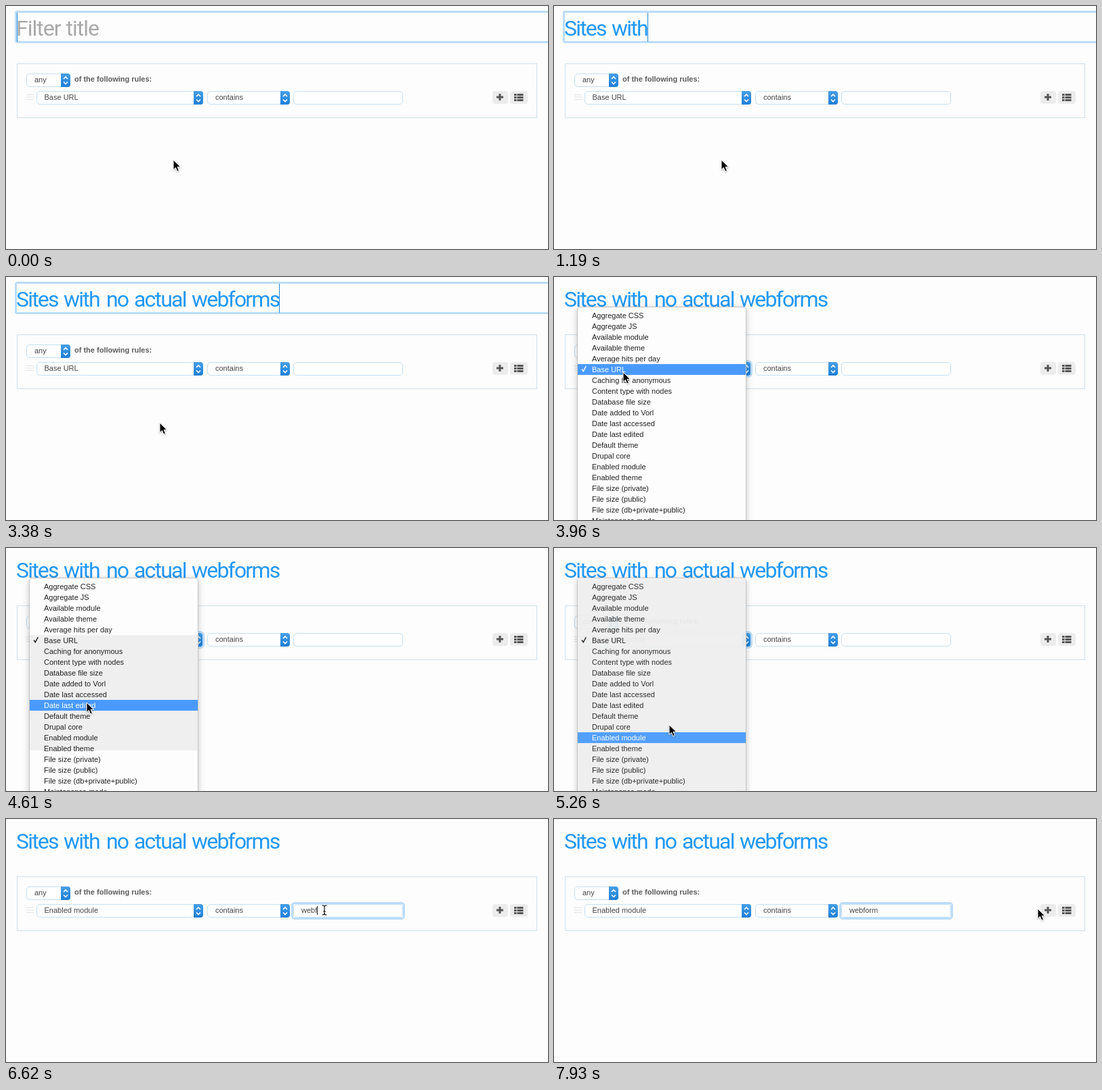
An HTML page for the animation above (7990 ms loop, 800x360 px).

```html
<!DOCTYPE html>
<html lang="en">
<head>
<meta charset="utf-8">
<title>Filter builder</title>
<style>
  html, body { margin: 0; width: 100%; height: 100%; overflow: hidden; background: #fdfdfd; }
  svg { display: block; width: 800px; height: 360px; }
  text { font: 11px "Liberation Sans", Arial, sans-serif; fill: #444; white-space: pre; }
  .title text { font: 32px Roboto, sans-serif; letter-spacing: -1.8px; fill: #2098f5; }
  .title .hint { letter-spacing: -1px; fill: #a9a9a9; }
  .bold { font-weight: bold; fill: #5c5c5c; }
  .field { fill: #fff; stroke: #c3dff1; }
  .ring { fill: none; stroke: #bbdcf8; stroke-width: 3; }
  #menu { filter: drop-shadow(0 2px 5px rgba(0, 0, 0, .22)); }
  #menu text { fill: #222; }
  #menu .on { fill: #fff; }
</style>
</head>
<body>
<svg viewBox="0 0 800 360">
  <defs>
    <linearGradient id="cap" x2="0" y2="1">
      <stop stop-color="#469fe6"/><stop offset="1" stop-color="#1d7fd6"/>
    </linearGradient>
    <filter id="soft" x="-50%" y="-50%" width="200%" height="200%">
      <feDropShadow dx="0" dy="1" stdDeviation="1" flood-opacity=".35"/>
    </filter>
  </defs>
  <rect width="800" height="360" fill="#fdfdfd"/>

  <g class="title">
    <g id="titleRing">
      <rect class="ring" x="14.5" y="8.5" width="800" height="45" rx="2"/>
    </g>
    <g id="hint"><text class="hint" x="15" y="44">Filter</text><text class="hint" x="88.5" y="44">title</text></g>
    <g id="words"></g>
    <rect id="titleCaret" y="10" width="1" height="43" fill="#2186dc"/>
  </g>

  <rect x="16.5" y="85.5" width="767" height="80" fill="none" stroke="#cfdfe9"/>
  <path d="M30 131.5h11M30 135h11M30 138.5h11" stroke="#e2e2e2"/>
  <g id="selects"></g>
  <text class="bold" x="101" y="112">of the following rules:</text>
  <rect class="field" x="424.5" y="126.5" width="161" height="19" rx="4.5"/>
  <rect id="selectRing" class="ring" x="43.5" y="124.5" width="248" height="23" rx="5"/>
  <rect id="inputRing" class="ring" x="422.5" y="124.5" width="165" height="23" rx="4"/>
  <text id="query" x="436" y="139"></text>
  <rect id="inputCaret" y="129" width="1" height="13" fill="#222"/>

  <g fill="#ececec">
    <rect x="718" y="126" width="23" height="19" rx="4"/>
    <rect x="744" y="126" width="26" height="19" rx="4"/>
  </g>
  <path d="M724 135h10M729 130v10" stroke="#555" stroke-width="3"/>
  <path d="M750 131.5h3.5m1 0h9M750 135.5h3.5m1 0h9M750 139.5h3.5m1 0h9" stroke="#555" stroke-width="3"/>

  <g id="menu">
    <rect x="34.5" y="44.5" width="249" height="340" rx="4.5" fill="#fdfdfd" stroke="#c4c4c4"/>
    <rect id="shade" x="35" width="248" fill="#efefef"/>
    <rect id="highlight" x="35" width="248" height="16" fill="#4a9afe"/>
    <path id="check" d="M41 136.5l2.3 3 4-7.5" fill="none" stroke-width="1.5"/>
    <g id="items"></g>
  </g>

  <g id="arrow" filter="url(#soft)">
    <path d="M0 0V14.5L3.4 11.4L5.7 17L8.4 15.9L6 10.4H10.6Z" fill="#000" stroke="#fff" stroke-width="1"/>
  </g>
  <g id="beam" fill="none" stroke-linecap="round">
    <path id="beamLine" d="M-3-7q3 0 3 2V5q0 2-3 2M3-7q-3 0-3 2V5q0 2 3 2M-1.5 2h3" stroke="#111" stroke-width="1.2"/>
  </g>
</svg>
<script>
const LOOP = 7990;
const OPEN = 3840, PICKED = 5140, CLOSED = 5450, INPUT_FOCUS = 5720, LEAVE = 7330;
const ROW = 16, MENU_TOP = 49;
const $ = id => document.getElementById(id);

const TITLE = "Sites with no actual webforms";
const WORD_X = [15, 85, 148, 189, 274];
const ITEMS = ["Aggregate CSS", "Aggregate JS", "Available module", "Available theme",
  "Average hits per day", "Base URL", "Caching for anonymous", "Content type with nodes",
  "Database file size", "Date added to Vorl", "Date last accessed", "Date last edited",
  "Default theme", "Drupal core", "Enabled module", "Enabled theme", "File size (private)",
  "File size (public)", "File size (db+private+public)", "Maintenance mode"];
const CHECKED = 5, CHOSEN = 14;

// Typing bursts: first key, last key, number of characters.
const TITLE_KEYS = [[300, 600, 5], [780, 1540, 10], [1600, 1600, 1], [1780, 2200, 6], [2380, 2900, 7]];
const QUERY_KEYS = [[6200, 6200, 1], [6380, 6970, 6]];

// Tracks: time followed by values.
const MOUSE = [[3260, 247, 228], [3780, 102, 141], [4140, 102, 141], [4400, 115, 280], [4610, 119, 229],
  [4780, 150, 296], [4900, 167, 280], [5140, 167, 280], [5260, 170, 262], [5550, 470, 135],
  [7330, 470, 135], [7700, 650, 121], [7930, 714, 133]];
const SHADE_END = [[4140, 129], [4400, 300], [4610, 300], [4780, 315], [5139, 315], [5140, 360]];
const MENU_ALPHA = [[5200, 1], [5260, .95], [CLOSED, 0]];

function track(keys, t) {
  if (t <= keys[0][0]) return keys[0].slice(1);
  const i = keys.findIndex(k => k[0] > t);
  if (i < 0) return keys[keys.length - 1].slice(1);
  const a = keys[i - 1], b = keys[i];
  const p = (t - a[0]) / (b[0] - a[0]);
  const e = p * p * (3 - 2 * p);
  return a.slice(1).map((v, j) => v + (b[j + 1] - v) * e);
}

function typed(bursts, t) {
  return bursts.reduce((sum, [from, to, n]) => {
    if (t < from) return sum;
    if (n === 1) return sum + 1;
    return sum + Math.min(n, 1 + Math.floor((t - from) / (to - from) * (n - 1) + 1e-6));
  }, 0);
}

function add(parent, tag, attrs, text = "") {
  const el = document.createElementNS("http://www.w3.org/2000/svg", tag);
  for (const k in attrs) el.setAttribute(k, attrs[k]);
  el.textContent = text;
  return parent.appendChild(el);
}

function addSelect(x, y, width, label) {
  const g = $("selects"), end = x + width, mid = end - 7, cy = y + 10;
  add(g, "rect", { class: "field", x: x + .5, y: y + .5, width: width - 1, height: 19, rx: 4.5 });
  add(g, "path", { d: `M${end - 14} ${y}h10q4 0 4 4v12q0 4-4 4h-10z`, fill: "url(#cap)" });
  add(g, "path", {
    d: `M${mid - 3} ${cy - 2}l3-3 3 3M${mid - 3} ${cy + 2.5}l3 3 3-3`,
    fill: "none", stroke: "#fff", "stroke-width": 1.6
  });
  return add(g, "text", { x: x + 12, y: y + 13 }, label);
}

addSelect(30, 100, 65, "any");
const fieldLabel = addSelect(45, 126, 246, "Base URL");
fieldLabel.setAttribute("x", 56.5);
addSelect(297, 126, 122, "contains");

const items = ITEMS.map((s, i) => add($("items"), "text", { x: 56, y: MENU_TOP + 12 + i * ROW }, s));

let start = 0;
const words = TITLE.split(" ").map((text, i) => {
  const word = { text, start, x: WORD_X[i], el: add($("words"), "text", { x: WORD_X[i], y: 44 }) };
  start += text.length + 1;
  return word;
});

const show = (id, on) => $(id).setAttribute("visibility", on ? "visible" : "hidden");
const set = (id, name, value) => $(id).setAttribute(name, value);

function drawTitle(t) {
  const count = typed(TITLE_KEYS, t);
  let caret = 16;
  for (const w of words) {
    w.el.textContent = w.text.slice(0, Math.max(0, count - w.start));
    if (count && count >= w.start) caret = w.x + (w.el.textContent ? w.el.getComputedTextLength() : 0);
  }
  set("titleCaret", "x", Math.round(caret));
  show("hint", count === 0);
  show("titleRing", t < OPEN);
  show("titleCaret", t < OPEN);
}

function drawMenu(t, mouseY) {
  const open = t >= OPEN && t < CLOSED;
  $("menu").style.display = open ? "" : "none";
  if (!open) return;
  const row = t < PICKED ? Math.floor((mouseY - MENU_TOP) / ROW) : CHOSEN;
  $("menu").style.opacity = track(MENU_ALPHA, t)[0];
  const top = t < PICKED ? 129 : 46;
  set("shade", "y", top);
  set("shade", "height", track(SHADE_END, t)[0] - top);
  set("highlight", "y", MENU_TOP + row * ROW);
  set("check", "stroke", row === CHECKED ? "#fff" : "#222");
  items.forEach((el, i) => el.setAttribute("class", i === row ? "on" : ""));
}

function drawInput(t) {
  const count = typed(QUERY_KEYS, t);
  $("query").textContent = "webform".slice(0, count);
  set("inputCaret", "x", Math.round(436 + (count ? $("query").getComputedTextLength() : 0)));
  show("inputRing", t >= INPUT_FOCUS);
  show("inputCaret", t >= INPUT_FOCUS && t < LEAVE);
  show("selectRing", t >= OPEN && t < INPUT_FOCUS);
  fieldLabel.textContent = ITEMS[t < PICKED ? CHECKED : CHOSEN];
}

function drawMouse(x, y) {
  const overInput = x > 424 && x < 586 && y > 126 && y < 146;
  const place = `translate(${Math.round(x)} ${Math.round(y)})`;
  set("arrow", "transform", place);
  set("beam", "transform", place);
  show("arrow", !overInput);
  show("beam", overInput);
}

function render(t) {
  const [x, y] = track(MOUSE, t);
  drawTitle(t);
  drawMenu(t, y);
  drawInput(t);
  drawMouse(x, y);
}

const begin = performance.now();
function tick() {
  render((performance.now() - begin) % LOOP);
  requestAnimationFrame(tick);
}
tick();
</script>
</body>
</html>
```
